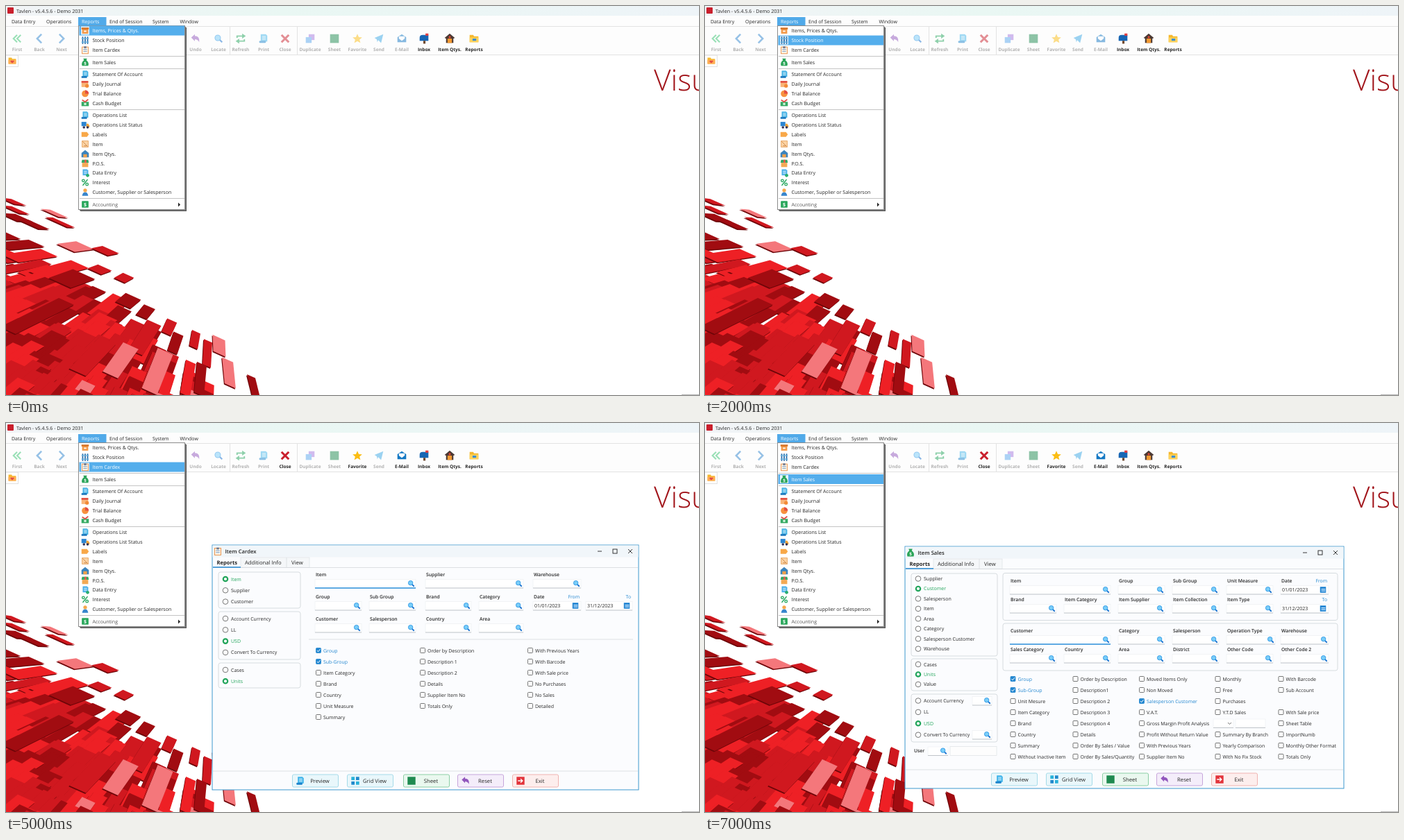
An HTML page for the animation above (8000 ms loop, 998 by 561 pixels).

```html
<!DOCTYPE html>
<html lang="en">
<head>
<meta charset="utf-8">
<title>Reports menu</title>
<style>
html, body { margin: 0; width: 100%; height: 100%; overflow: hidden; background: #fff; }
svg { display: block; font-family: "Open Sans", "Noto Sans", sans-serif; text-rendering: geometricPrecision; }
.win { visibility: hidden; }
</style>
</head>
<body>
<svg id="stage" width="998" height="561" viewBox="0 0 998 561"></svg>
<script>
const INK = '#262626', BLUE = '#2387d0', GREEN = '#22a55b', RED = '#c91f2c';

// Drawing helpers; text is placed by the middle of its line
const text = (x, y, s, fill = INK, size = 7, weight = 400, anchor = 'start') =>
  `<text x="${x}" y="${y + size * .36}" fill="${fill}" font-size="${size}" font-weight="${weight}" text-anchor="${anchor}">${s}</text>`;
const rect = (x, y, w, h, fill, stroke = 'none', r = 0, sw = 1) =>
  `<rect x="${x}" y="${y}" width="${w}" height="${h}" fill="${fill}" stroke="${stroke}" stroke-width="${sw}" rx="${r}"/>`;
const fillPath = (d, fill) => `<path d="${d}" fill="${fill}"/>`;
const line = (d, stroke, w = 1) => `<path d="${d}" fill="none" stroke="${stroke}" stroke-width="${w}"/>`;
const disc = (x, y, r, fill, stroke = 'none', w = 1) =>
  `<circle cx="${x}" cy="${y}" r="${r}" fill="${fill}" stroke="${stroke}" stroke-width="${w}"/>`;

const page = color => fillPath('M-4-6H3L5-4V4H-4Z', color) + line('M-2-3H3M-2-1H3M-2 1H3', '#fff', .8);
const folder = fillPath('M-6-5H-1L0-3H6V5H-6Z', '#f5b82e') + rect(-6, -1.5, 12, 6.5, '#ffd35c');

// Icons live in a box from -6 to 6
const icons = {
  first: line('M0-5L-5 0 0 5M5-5L0 0 5 5', '#35c46f', 2),
  back: line('M3-6L-3 0 3 6', '#2f86d0', 2.4),
  next: line('M-3-6L3 0-3 6', '#2f86d0', 2.4),
  undo: fillPath('M-6-1.5L-1-6V-3.5Q6-3.5 5 5Q3 1-1 1V3.5Z', '#9257bd'),
  loupe: line('M1 1L5 5', '#1c73cf', 2.2) + disc(-1, -1, 3.8, '#79cdf8', '#2a94e4'),
  refresh: line('M-5-1V-3.5H4M5 1V3.5H-4', GREEN, 1.8) + fillPath('M2-7L7-3.5 2 0ZM-2 0L-7 3.5-2 7Z', GREEN),
  print: page('#3fb4ea') + rect(-6, 3, 9, 3, '#1b83cc', 'none', 1),
  close: line('M-5-5L5 5M5-5L-5 5', RED, 2.8),
  copy: rect(-2, -6, 8, 8, '#a77be0') + rect(-6, -2, 8, 8, '#5ba8ee'),
  sheet: rect(-6, -6, 12, 12, '#1f8a50'),
  star: fillPath('M0-6.5L2-2 6.5-1.7 3 1.5 4.2 6 0 3.5-4.2 6-3 1.5-6.5-1.7-2-2Z', '#fbbd13'),
  send: fillPath('M-6-1L6-6 3 6-1 2-2 5-3 1Z', '#39a7e6'),
  mail: fillPath('M-6-2L0-6 6-2V5H-6Z', '#1478c4') + fillPath('M-4-3H4V0L0 3-4 0Z', '#fff'),
  inbox: fillPath('M-6-1Q-6-5-2-5H6V3H-6Z', '#1766b4') + rect(-1, 3, 3, 4, '#704b32') + rect(2, -7, 4, 3, '#e23d3d'),
  house: fillPath('M-7-1L0-7 7-1 5 0V6H-5V0Z', '#4b3934') + rect(-3, 0, 6, 6, '#f49a32') + disc(0, -2, 1.5, '#e24632'),
  folder: folder + rect(-2, 0, 5, 3, '#3d8fd1'),
  favorites: folder.replace('#ffd35c', '#ffad54') + fillPath('M0 4L-3 1Q-1-2 0 1Q1-2 3 1Z', '#e04545'),
  box: rect(-5, -3, 10, 8, '#f39a4a') + rect(-6, -5, 12, 3, '#d87629') + rect(-2, 0, 4, 2, '#fff'),
  stock: line('M-4-6V6M0-6V6M4-6V6', '#2b6ca8', 2) + line('M-6-3H6M-6 3H6', '#65b4e2', 1.6),
  clip: rect(-5, -5, 10, 11, '#fff4e4', '#e78b41') + rect(-2, -6, 4, 3, '#6b7890') + line('M-3-1H3M-3 2H3', '#5c8fc7'),
  money: fillPath('M-3-6H3L2-3Q7 1 5 6H-5Q-7 1-2-3Z', '#2aa458') + text(0, 1.5, '$', '#fff', 7, 700, 'middle'),
  scroll: page('#42b1e4') + rect(-6, 3, 9, 3, '#1c78bd'),
  journal: rect(-6, -5, 11, 10, '#f9b477') + rect(-6, -5, 11, 3, '#e14e42') + disc(3, 3, 3, '#f28b37'),
  pie: disc(0, 0, 5.5, '#f7913f') + fillPath('M0 0V-6A6 6 0 0 1 6 0Z', '#e34d43'),
  cash: rect(-6, -2, 12, 7, '#35aa63') + disc(0, 1.5, 2, '#d7f4dd') + line('M-5-5L0-2 5-6', '#df4d45', 2),
  truck: rect(-6, -5, 8, 7, '#2d86d1') + fillPath('M2-2H5L7 1V4H2Z', '#f2a437') + disc(-2, 4, 2, '#335') + disc(4, 4, 2, '#335'),
  tag: fillPath('M-6-4H3L6 0 3 4H-6Z', '#f8a848'),
  item: rect(-5, -5, 10, 10, '#fbd2a3', '#e8a460') + line('M-4-4L4 4M-2 3H3', '#c98443'),
  store: fillPath('M-6-1L0-6 6-1V6H-6Z', '#3c84bd') + rect(-3, 1, 6, 5, '#f0a04a'),
  pos: rect(-5, -1, 10, 7, '#f3a954') + fillPath('M-5-6H5L6-1H-6Z', '#36a965') + rect(-1, -6, 3, 5, '#e7594e'),
  entry: page('#48aee9') + disc(4, 4, 2.7, '#28ad71'),
  percent: line('M4-5L-4 5', GREEN, 1.7) + disc(-3, -3, 2, 'none', GREEN, 1.5) + disc(3, 3, 2, 'none', GREEN, 1.5),
  person: fillPath('M-5 6Q-4 0 0 0T5 6Z', '#3785cc') + disc(0, -3, 3, '#f5a94c'),
  dollar: rect(-5.5, -5.5, 11, 11, '#27a65a', 'none', 1) + text(0, 0, '$', '#fff', 8, 700, 'middle'),
  calendar: rect(-5, -5, 10, 10, '#1f83d2') + line('M-3-1H4M-3 2H4', '#cfeaff', 1.5),
  grid: rect(-6, -6, 5, 5, '#28b1d9') + rect(1, -6, 5, 5, '#2089cc') + rect(-6, 1, 5, 5, '#2089cc') + rect(1, 1, 5, 5, '#28b1d9'),
  exit: rect(-6, -6, 12, 12, '#e3343b') + line('M-4 0H3M0-3L3 0 0 3', '#fff', 1.4)
};
const icon = (name, x, y, scale = 1, opacity = 1) =>
  `<g transform="translate(${x} ${y}) scale(${scale})" opacity="${opacity}">${icons[name]}</g>`;

// Red tiles lie on a plane whose long edges meet at one point
const VANISH = { x: 300, y: 320 };
const SHADES = ['#a10c11', '#d0181f', '#ee2025', '#f4777b'];
function tile(x, y, depth, width, shade) {
  const rx = (x - VANISH.x) * depth / 2, ry = (y - VANISH.y) * depth / 2, cy = width * .45;
  const d = `M${x - rx - width} ${y - ry - cy}l${2 * width} ${2 * cy} ${2 * rx} ${2 * ry} ${-2 * width} ${-2 * cy}z`;
  return `<path d="${d}" transform="translate(-1 1.5)" fill="#6d0508"/>` + fillPath(d, SHADES[shade]);
}
function tiles() {
  let seed = 11, out = '';
  const random = () => (seed = seed * 16807 % 2147483647) / 2147483647;
  for (let y = 328; y < 590; y += 15)
    for (let x = -20; x < Math.min((y - 325) * 1.6, 160 + y - 425) - 14; x += 27) {
      const roll = random();
      out += tile(x + random() * 16, y + random() * 10, .13 + random() * .14, 8 + random() * 6,
        roll < .27 ? 0 : roll < .68 ? 1 : roll < .96 ? 2 : 3);
    }
  const placed = [
    [10, 282, .06, 11, 1], [15, 305, .08, 13, 0], [40, 315, .06, 15, 0], [14, 294, .05, 13, 1],
    [70, 299, .06, 13, 3], [78, 312, .05, 16, 1], [100, 347, .14, 13, 3], [143, 353, .1, 12, 1],
    [135, 380, .09, 10, 1], [170, 392, .1, 8, 1], [176, 425, .12, 11, 0], [201, 441, .12, 8, 0],
    [235, 463, .13, 7, 1], [244, 486, .16, 7, 0], [272, 481, .14, 6, 1], [290, 501, .2, 6, 1],
    [307, 490, .14, 9, 3], [321, 529, .18, 8, 3], [357, 550, .14, 6, 0], [45, 447, .33, 11, 0],
    [95, 393, .17, 16, 0], [200, 478, .27, 10, 1], [165, 511, .22, 11, 3], [218, 527, .28, 11, 3],
    [262, 537, .22, 7, 2], [280, 538, .2, 7, 0], [125, 505, .25, 12, 1]
  ];
  return out + placed.map(p => tile(...p)).join('');
}

// Toolbar: name, icon, centre, state (0 off, 1 on, 2 on while a window is open)
const tools = [
  ['First', 'first', 16, 0], ['Back', 'back', 48, 0], ['Next', 'next', 80, 0], ['Undo', 'undo', 273, 0],
  ['Locate', 'loupe', 306, 0], ['Refresh', 'refresh', 338, 0], ['Print', 'print', 371, 0], ['Close', 'close', 402, 2],
  ['Duplicate', 'copy', 438, 0], ['Sheet', 'sheet', 473, 0], ['Favorite', 'star', 506, 2], ['Send', 'send', 537, 0],
  ['E-Mail', 'mail', 570, 2], ['Inbox', 'inbox', 602, 1], ['Item Qtys.', 'house', 639, 1], ['Reports', 'folder', 674, 1]
];
const tool = ([name, glyph, x], on) =>
  icon(glyph, x, 47, 1.05, on ? 1 : .5) + text(x, 63, name, on ? INK : '#b2b2b2', 6.5, 700, 'middle');

const menu = [
  ['Items, Prices & Qtys.', 'box', 35.5], ['Stock Position', 'stock', 49.5], ['Item Cardex', 'clip', 63.5],
  ['Item Sales', 'money', 81], ['Statement Of Account', 'scroll', 98.5], ['Daily Journal', 'journal', 112.5],
  ['Trial Balance', 'pie', 126.5], ['Cash Budget', 'cash', 140], ['Operations List', 'scroll', 157.5],
  ['Operations List Status', 'truck', 171.5], ['Labels', 'tag', 185.3], ['Item', 'item', 199], ['Item Qtys.', 'store', 213],
  ['P.O.S.', 'pos', 227], ['Data Entry', 'entry', 240.8], ['Interest', 'percent', 254.5],
  ['Customer, Supplier or Salesperson', 'person', 268.5], ['Accounting', 'dollar', 286]
];

// Form parts
const label = (x, y, s) => text(x, y, s, INK, 6.8, 600);
const input = (x, y, right, focus) => rect(x, y - 6, right - x, 12.5, '#fff', '#eef0f2', 0, .7) +
  line(`M${x} ${y + 6.5}H${right}`, focus ? '#2b8fda' : '#a9b0b6', focus ? 1.3 : .7);
const search = (x, y, right, focus) => input(x, y, right, focus) + icon('loupe', right - 6.5, y, .85);
const field = (x, y, right, name, focus) => label(x, y, name) + search(x - 1, y + 12.5, right, focus);
const fields = (y, list) => list.map(f => field(f[0], y, f[1], f[2], f[3])).join('');
const date = (x, y, right, name, value, tag = '') => label(x, y, name) + input(x - 1, y + 12.5, right) +
  text(x + 1, y + 12.5, value) + icon('calendar', right - 8, y + 12.5, .85) + text(right - 2, y, tag, BLUE, 6.8, 400, 'end');
const combo = (x, y, right) => input(x, y, right) + line(`M${right - 8} ${y - 1}l2.5 2.5 2.5-2.5`, '#555', .8);
const panel = (x, y, w, h) => rect(x, y, w, h, '#fbfcfe', '#d3d8dc', 3, .9);
const rule = (y, x1, x2) => line(`M${x1} ${y}H${x2}`, '#d5d9dc', .8);
const radios = (x, y, w, h, first, step, chosen, names) => panel(x, y, w, h) + names.split('|').map((s, i) => {
  const cy = first + i * step, on = i === chosen;
  return disc(x + 10, cy, on ? 3.2 : 3.8, '#fff', on ? GREEN : '#555', on ? 2.2 : .8) + text(x + 18, cy, s, on ? GREEN : INK);
}).join('');
const CHECKED = ['Group', 'Sub-Group', 'Salesperson Customer'];
function check(x, y, s) {
  const on = CHECKED.includes(s);
  return rect(x - 3.5, y - 3.5, 7, 7, on ? BLUE : '#fff', on ? BLUE : '#555', 1, .8) +
    (on ? line(`M${x - 2} ${y}l1.5 1.8 3-3.6`, '#fff') : '') + text(x + 7, y, s, on ? BLUE : INK, 6.95);
}
const checks = (x, y, step, names) =>
  names.split('|').map((s, i) => s && check(x, y + i * step, s)).join('');

const buttons = [
  ['Preview', 'print', 412, '#e9f7fb', '#a5dbe9'], ['Grid View', 'grid', 491, '#e9f7fb', '#a5dbe9'],
  ['Sheet', 'sheet', 572, '#eaf8ef', '#8ccfa4'], ['Reset', 'undo', 650, '#f4edfa', '#c6a5db'], ['Exit', 'exit', 729, '#fdeeed', '#f0b3b0']
];
function win(x, y, right, bottom, glyph, title, body) {
  const cy = y + 9, tabY = y + 25;
  return `<g class="win">` + rect(x, y, right - x, bottom - y, '#fbfcfe', '#3c98cd') +
    rect(x + .5, y + .5, right - x - 1, 17, '#f1f6fa') + icon(glyph, x + 8, cy, .9) + text(x + 18.5, cy, title, INK, 7.7, 600) +
    line(`M${right - 59} ${cy}h6M${right - 15} ${cy - 3}l6 6m0-6l-6 6`, '#222', .9) + rect(right - 37, cy - 3, 6, 6, 'none', '#222', 0, .9) +
    rect(x + 41, y + 18, 99, 14.5, '#f5f7f9', '#dde1e4', 0, .7) + line(`M${x + 107} ${y + 18}v14`, '#dde1e4') +
    rule(y + 32.5, x + 1, right - 1) + line(`M${x + 1} ${y + 32}h40`, BLUE, 1.3) +
    text(x + 6.5, tabY, 'Reports', INK, 7.6, 700) + text(x + 47, tabY, 'Additional Info', INK, 7.7) + text(x + 114, tabY, 'View', INK, 7.7) +
    body + rule(bottom - 27, x + 1, right - 1) + buttons.map(([s, g, bx, fill, edge]) =>
      rect(bx + .5, bottom - 22, 66, 18, fill, edge, 2) + icon(g, bx + 12, bottom - 13, .95) +
      text(bx + 40, bottom - 13, s, INK, 7.7, 400, 'middle')).join('') + '</g>';
}

const prices = win(318, 176, 890, 529, 'box', 'Items, Prices & Qtys.',
  radios(327, 215, 112, 69, 225, 16.3, 0, 'Item|Supplier|Group|Warehouse') +
  radios(327, 289, 112, 69, 299, 16.3, 2, 'Account Currency|LL|USD|Convert To Currency') +
  radios(327, 363, 112, 36, 373, 16.3, 1, 'Cases|Units') +
  fields(219, [[461, 611, 'Supplier', 1], [626, 776, 'Item'], [791, 876, 'Warehouse']]) +
  fields(251, [[461, 531, 'Group'], [546, 611, 'Sub Group'], [626, 696, 'Unit Measure'], [711, 776, 'Item Category']]) +
  fields(283, [[461, 531, 'Brand'], [546, 611, 'Item Type'], [626, 696, 'Country'], [711, 776, 'Area']]) +
  date(791, 251, 876, 'Date', '31/12/2023', 'To') + rule(312, 451, 882) +
  checks(465, 328, 16, 'Group|Sub-Group|Item Category|Brand|Country|Unit Measure|Summary') +
  checks(600, 328, 16, 'Order by Description|Description 1|Description 2|Description 3|Details|Supplier Item No') +
  checks(740, 328, 16, 'With Zero Balances|Only Zero Balances|Negative Quantity|Positive Quantity|With Barcode|Picture'));

const stock = win(267, 171, 941, 533, 'stock', 'Stock Position',
  radios(275, 209.5, 112, 52, 219, 16.5, 0, 'Item|Supplier|Warehouse') +
  radios(275, 266, 112, 69, 276, 16.4, 2, 'Account Currency|LL|USD|Convert To Currency') +
  radios(275, 339, 112, 36, 349, 16.3, 1, 'Cases|Units') + radios(275, 379, 112, 36, 389, 16.5, 0, 'Qty.|Value') +
  search(361, 276, 385) + search(361, 325, 385) +
  date(281, 425, 387, 'Print Date:', '21/01/2024 at 23:08') +
  label(281, 455, 'Custom Report') + combo(280, 467.5, 387) + check(285, 482.5, 'Without Empty B.O.E&#160; Export') +
  fields(213, [[415, 572, 'Supplier', 1], [587, 743, 'Item'], [758, 833, 'Warehouse'], [848, 917, 'Operation Type']]) +
  fields(244.5, [[415, 486, 'Group'], [501, 572, 'Sub Group'], [587, 657, 'Unit Measure'], [672, 743, 'Item Category']]) +
  fields(276, [[415, 486, 'Brand'], [501, 572, 'Item Type'], [587, 657, 'Item Collection']]) +
  fields(314, [[415, 486, 'Category'], [501, 572, 'Sales Category'], [587, 657, 'Country'], [672, 743, 'Area'], [758, 833, 'District']]) +
  fields(351.5, [[415, 486, 'Location'], [501, 572, 'Color'], [587, 657, 'Size'], [672, 743, 'Batch']]) +
  date(758, 244.5, 833, 'Date', '01/01/2023', 'From') + date(848, 244.5, 917, '', '31/12/2023', 'To') +
  date(758, 276, 833, 'Item Date', '01/01/1900', 'From') + date(848, 276, 917, '', '01/01/1900', 'To') +
  date(758, 351.5, 833, 'Expiry Date', '01/01/1900', 'From') + date(848, 351.5, 917, '', '01/01/1900', 'To') +
  [304, 342, 380].map(y => rule(y, 403, 934)).join('') +
  checks(422.5, 387, 10.7, 'Group|Sub-Group|Item Category|Brand|Country|Unit Measure|Summary|Totals Only|With Previous Years|Transfer Average Saleprice|Order By Location') +
  checks(551.5, 387, 10.7, 'Order by Description|Description 1|Description 2|Description 3|Description 4|Details|Supplier Item No|Last Purchase / Invoice Date|With No Fix Stock|Without Non Moved Item At All|Sales With Zero & Negative Qty') +
  checks(680.5, 387, 10.7, 'With Zero Balances|Only Zero Balances|Negative Quantity|Positive Quantity|Av. Qty.|No Purchases|No Sales|Order By Sales / Value|Order By Sales/Quantity|Without Counter Value|With Related Item / Suppn') +
  checks(809.5, 387, 10.7, 'Stock Value|Stock Position|Detailed|Warehouse|Assets|With Sale price|With Barcode|Without Inactive Item|Only Inactive Item|Detailed Serial|Cost Of Goods Sold') +
  check(874, 387, 'Fifo') + check(874, 429.8, 'Picture') + check(872, 451.2, 'Item/Barcode'));

const cardex = win(297, 176, 911, 529, 'clip', 'Item Cardex',
  radios(306, 215, 118, 52, 225, 16.3, 0, 'Item|Supplier|Customer') +
  radios(306, 272, 118, 69, 282, 16.3, 2, 'Account Currency|LL|USD|Convert To Currency') +
  radios(306, 346, 118, 36, 356, 16.3, 1, 'Cases|Units') +
  fields(219, [[446, 590, 'Item', 1], [605, 745, 'Supplier'], [760, 828, 'Warehouse']]) +
  fields(251, [[446, 512, 'Group'], [524, 590, 'Sub Group'], [605, 670, 'Brand'], [682, 745, 'Category']]) +
  fields(283, [[446, 512, 'Customer'], [524, 590, 'Salesperson'], [605, 670, 'Country'], [682, 745, 'Area']]) +
  date(760, 251, 828, 'Date', '01/01/2023', 'From') + date(836, 251, 902, '', '31/12/2023', 'To') + rule(312, 436, 903) +
  checks(450, 328, 16, 'Group|Sub-Group|Item Category|Brand|Country|Unit Measure|Summary') +
  checks(600, 328, 16, 'Order by Description|Description 1|Description 2|Details|Supplier Item No|Totals Only') +
  checks(755, 328, 16, 'With Previous Years|With Barcode|With Sale price|No Purchases|No Sales|Detailed'));

const sales = win(288, 178, 920, 527, 'money', 'Item Sales',
  radios(297, 217, 124, 119, 224.5, 14.45, 1, 'Supplier|Customer|Salesperson|Item|Area|Category|Salesperson Customer|Warehouse') +
  radios(297, 340, 124, 46, 348, 14.45, 1, 'Cases|Units|Value') +
  radios(297, 391, 124, 69, 400.5, 16.4, 2, 'Account Currency|LL|USD|Convert To Currency') +
  search(385, 400.5, 413) + search(385, 449.5, 413) + label(301, 473, 'User') + search(321, 473, 350) +
  rect(353, 466.5, 67, 13, '#fdfdfd', '#e2e5e8', 0, .8) + panel(429, 216.5, 482, 68) + panel(429, 289, 482, 68) +
  fields(228, [[440, 584, 'Item'], [596, 662, 'Group'], [674, 740, 'Sub Group'], [752, 818, 'Unit Measure']]) +
  fields(255, [[440, 506, 'Brand'], [518, 584, 'Item Category'], [596, 662, 'Item Supplier'], [674, 740, 'Item Collection'], [752, 818, 'Item Type']]) +
  fields(300, [[440, 584, 'Customer', 1], [596, 662, 'Category'], [674, 740, 'Salesperson'], [752, 821, 'Operation Type'], [830, 898, 'Warehouse']]) +
  fields(327, [[440, 506, 'Sales Category'], [518, 584, 'Country'], [596, 662, 'Area'], [674, 740, 'District'], [752, 818, 'Other Code'], [830, 898, 'Other Code 2']]) +
  date(830, 228, 898, 'Date', '01/01/2023', 'From') + date(830, 255, 898, '', '31/12/2023', 'To') +
  checks(443.5, 369, 16, 'Group|Sub-Group|Unit Mesure|Item Category|Brand|Country|Summary|Without Inactive Item') +
  checks(533.5, 369, 16, 'Order by Description|Description1|Description 2|Description 3|Description 4|Details|Order By Sales / Value|Order By Sales/Quantity') +
  checks(629, 369, 16, 'Moved Items Only|Non Moved|Salesperson Customer|V.A.T.|Gross Margin Profit Analysis|Profit Without Return Value|With Previous Years|Supplier Item No') +
  checks(738.5, 369, 16, 'Monthly|Free|Purchases|Y.T.D Sales||Summary By Branch|Yearly Comparison|With No Fix Stock') +
  checks(829.5, 369, 16, 'With Barcode|Sub Account||With Sale price|Sheet Table|ImportNumb|Monthly Other Format|Totals Only') +
  combo(732, 433, 761) + input(764, 433, 807));

const stage = document.getElementById('stage');
stage.innerHTML = `<defs><linearGradient id="bar"><stop stop-color="#f2f4f7"/><stop offset=".4" stop-color="#e9f7f3"/><stop offset="1" stop-color="#eef4f8"/></linearGradient></defs>` +
  rect(0, 0, 998, 561, '#fff') + tiles() + text(933, 107, 'Visu', '#a1141a', 42.5, 300) + rect(973, 560, 25, 1, '#b9b9b9') +
  rect(0, 0, 998, 14, 'url(#bar)') + rect(2, 2, 9, 9, RED, 'none', 1) + text(15, 7, 'Tavlen - v5.4.5.6 - Demo 2031', INK, 7.1) +
  rect(0, 14, 998, 57, '#fdfdfd') + line('M0 29.5H998M0 70.5H998M322.5 30V70M419.5 30V70', '#e3e3e3') +
  rect(104, 16, 40.5, 12.5, '#51aae9') +
  [['Data Entry', 8], ['Operations', 58], ['Reports', 109], ['End of Session', 149], ['System', 211], ['Window', 250.5]]
    .map(([s, x]) => text(x, 22, s, x === 109 ? '#fff' : INK)).join('') +
  tools.map(t => `<g class="${t[3] === 2 ? 'idle' : ''}">${tool(t, t[3] === 1)}</g>` +
    (t[3] === 2 ? `<g class="live">${tool(t, true)}</g>` : '')).join('') +
  rect(-1, 71, 18.5, 16.5, '#fff', '#e0e0e0') + icon('favorites', 9, 79, .9) +
  rect(107, 31, 153, 265, '#000a') + rect(106, 30, 153, 265, '#777') + rect(104.5, 28.5, 153, 265, '#fff', '#8b8b8b') +
  line('M106 72.5H257M106 90.5H257M106 149.5H257M106 277.5H257', '#c4c4c4') +
  `<g id="mark">${rect(105.5, -7, 151.5, 14, '#54aeec')}${rect(108, -6, 12, 12, '#e6f3fc')}</g>` +
  menu.map(([s, g, y]) => icon(g, 114, y, .88) + `<g class="row">${text(124.5, y, s, s === 'Accounting' ? '#555' : INK, 7.05)}</g>`).join('') +
  fillPath('M248 283.5l3 3-3 3z', '#222') + prices + stock + cardex + sales;

const all = selector => [...stage.querySelectorAll(selector)];
const show = (node, on) => { node.style.visibility = on ? 'visible' : 'hidden'; };
const mark = document.getElementById('mark');
const wins = all('.win'), rows = all('.row text'), idle = all('.idle'), live = all('.live');
let shown = -1;

// Each report is first picked in the menu, then opened one second later
function play() {
  const second = Math.floor(performance.now() % 8000 / 1000);
  if (second !== shown) {
    shown = second;
    const pick = second >> 1, open = second % 2 === 1;
    mark.setAttribute('transform', `translate(0 ${menu[pick][2]})`);
    for (let i = 0; i < 4; i++) {
      rows[i].setAttribute('fill', i === pick ? '#fff' : INK);
      show(wins[i], open && i === pick);
    }
    idle.forEach(node => show(node, !open));
    live.forEach(node => show(node, open));
  }
  requestAnimationFrame(play);
}
play();
</script>
</body>
</html>
```
